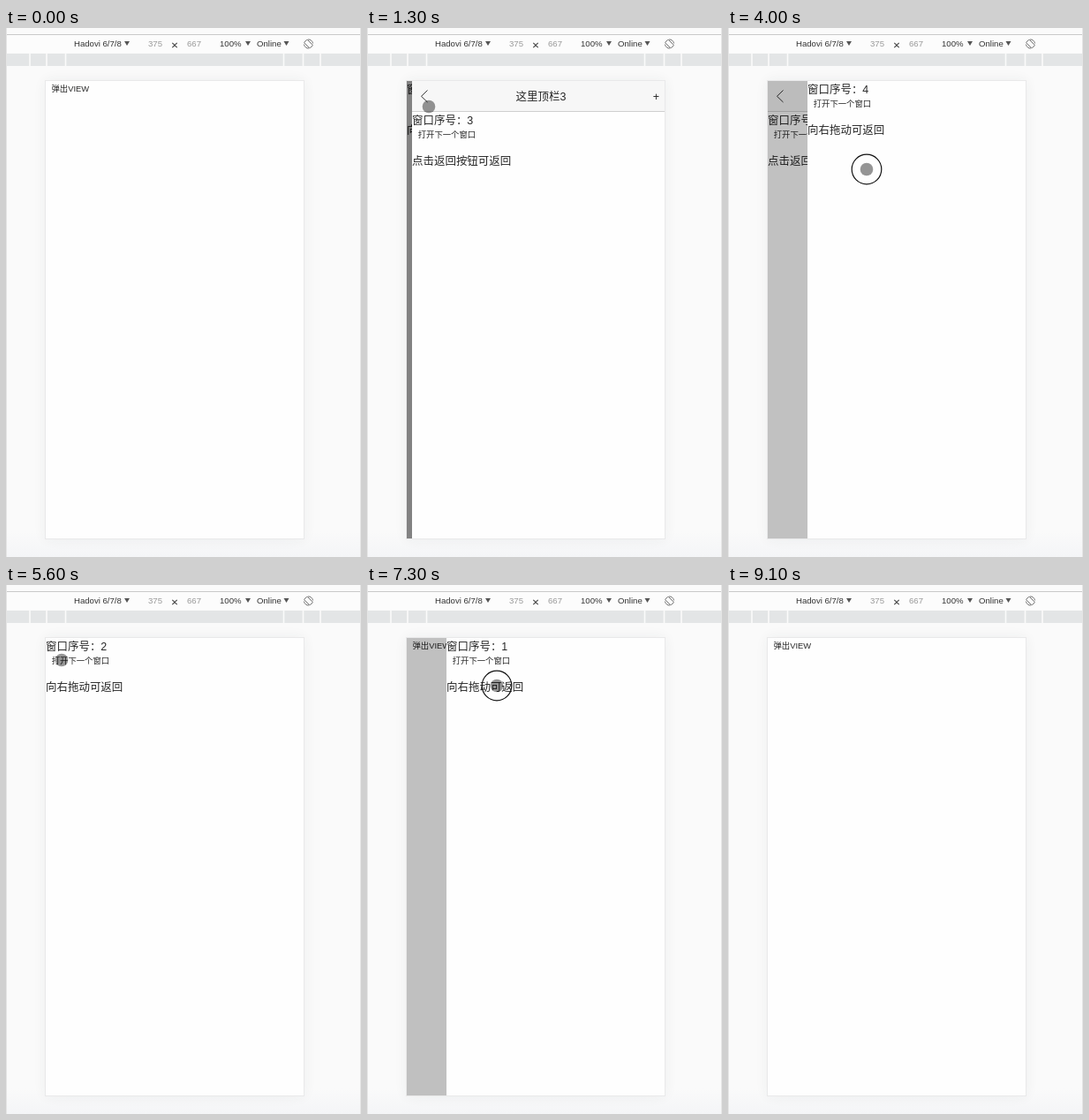
These frames come from a looping animation (402x599 px, 9200 ms). An HTML page:

```html
<!DOCTYPE html>
<html lang="zh-CN">
<head>
<meta charset="utf-8">
<title>Window stack</title>
<style>
  html, body { margin: 0; width: 100%; height: 100%; overflow: hidden; background: #fafafa; }
  svg { display: block; }
  .stage { position: absolute; left: 0; top: 0; }
  .phone {
    position: absolute; left: 45px; top: 60px; width: 292px; height: 518px;
    background: #fefefe; box-shadow: 0 0 0 1px #e9e9ea, 0 0 14px rgba(40, 50, 60, .07);
  }
  text { font-family: "Liberation Sans", "Noto Sans CJK SC", "Noto Sans CJK", sans-serif; fill: #262626; }
  .bar text { font-size: 9.6px; fill: #333; }
  .bar .size { fill: #999; }
  .big { font-size: 12.48px; }
  .small { font-size: 9.36px; }
</style>
</head>
<body>
<svg class="stage" width="402" height="599">
  <defs>
    <linearGradient id="floor" x1="0" y1="0" x2="0" y2="1">
      <stop offset="0" stop-color="#fafafa"/><stop offset="1" stop-color="#f4f5f7"/>
    </linearGradient>
    <path id="arrow" d="M-3 -2.5H3L0 2.5Z" fill="#555"/>
  </defs>
  <rect width="402" height="599" fill="#fafafa"/>
  <rect y="570" width="402" height="29" fill="url(#floor)"/>
  <rect y="7" width="402" height="1" fill="#c9c9c9"/>
  <rect y="8" width="402" height="20" fill="#fcfcfc"/>
  <rect y="29" width="402" height="14" fill="#e3e5e6"/>
  <path d="M27 29v14M46 29v14M67.5 29v14M314.5 29v14M336.5 29v14M356 29v14" stroke="#fafafa" stroke-width="1.6"/>
  <path d="M.5 0V599M401.5 0V599" stroke="#e4e4e4"/>
  <g class="bar">
    <text x="77" y="21">Hadovi 6/7/8</text>
    <text x="161" y="21" class="size">375</text>
    <text x="205" y="21" class="size">667</text>
    <text x="242" y="21">100%</text>
    <text x="284" y="21">Online</text>
    <use href="#arrow" x="137" y="17.5"/>
    <use href="#arrow" x="274" y="17.5"/>
    <use href="#arrow" x="317.5" y="17.5"/>
    <path d="M188.3 16.8l5.4 5.4M193.7 16.8l-5.4 5.4" stroke="#444" stroke-width="1.1"/>
    <g fill="none" stroke="#666" stroke-width=".9" transform="translate(342.5 18)">
      <rect x="-2.5" y="-4.6" width="5" height="9.2" rx=".8" transform="rotate(-45)"/>
      <path d="M-.5 -5A5 5 0 0 1 5 -.5M.5 5A5 5 0 0 1 -5 .5"/>
    </g>
  </g>
</svg>
<div class="phone">
  <svg id="screen" width="292" height="518">
    <text class="small" x="6.5" y="12">弹出VIEW</text>
  </svg>
</div>
<svg class="stage" width="402" height="599">
  <g id="cursor">
    <circle r="7.3" fill="#000" fill-opacity=".41"/>
    <circle id="ring" r="16.8" fill="none" stroke="#111" stroke-width="1.2"/>
  </g>
</svg>
<script>
const LOOP = 9200, STEP = 100, SLIDE = 410;
const WIDTH = 292, DIM = 0.5, PULL = 45.3;
const $ = id => document.getElementById(id);

// When each window opens, is grabbed (if draggable) and is let go or closed
const windows = [
  { open: 250, grab: 6650, close: 7700 },
  { open: 600, grab: 5600, close: 6000 },
  { open: 1000, close: 5000 },
  { open: 1900, grab: 2600, close: 4100 }
];

// Pointer stops: [time, x, y]
const stops = [
  [100, 70, 95], [250, 63, 69], [600, 63, 85], [1300, 70, 89], [1900, 88, 120],
  [2600, 92, 152], [2900, 117, 156], [3200, 198, 139], [4000, 157, 160],
  [5000, 60, 77], [5600, 63, 85], [6000, 172, 78], [6500, 114, 112],
  [7300, 147, 114], [7700, 195, 117]
];

const header = n => `
  <rect width="${WIDTH}" height="35" fill="#f7f7f7"/>
  <path d="M0 34.5H${WIDTH}" stroke="#cfcfcf"/>
  <path d="M17.5 10.5L10.5 17.3L17.5 24" fill="none" stroke="#333"/>
  <text class="big" x="146" y="21.7" text-anchor="middle">这里顶栏${n}</text>
  <text class="big" x="276.5" y="22" text-anchor="middle">+</text>`;

function page({ grab }, i) {
  const n = i + 1;
  return `<rect id="dim${i}" width="${WIDTH}" height="518"/>
  <g id="page${i}">
    <rect width="${WIDTH}" height="518" fill="#fefefe"/>
    ${grab ? "" : header(n)}
    <g transform="translate(0 ${grab ? 0 : 35})">
      <text class="big" y="13.7">窗口序号：${n}</text>
      <text class="small" x="6.7" y="29">打开下一个窗口</text>
      <text class="big" y="60.3">${grab ? "向右拖动可返回" : "点击返回按钮可返回"}</text>
    </g>
  </g>`;
}
$("screen").insertAdjacentHTML("beforeend", windows.map(page).join(""));

const clamp = p => Math.min(1, Math.max(0, p));
const mix = (a, b, p) => a + (b - a) * p;
const smooth = p => p * p * (3 - 2 * p);
const slide = t => 1 - (1 - clamp(t / SLIDE)) ** 3;

function pointer(t) {
  const i = Math.max(1, stops.findIndex(s => s[0] >= t));
  const [a, b] = t < stops.at(-1)[0] ? [stops[i - 1], stops[i]] : stops.slice(-2);
  const p = smooth(clamp((t - a[0]) / (b[0] - a[0])));
  return [mix(a[1], b[1], p), mix(a[2], b[2], p)];
}

// A grabbed window follows the pointer elastically, up to PULL
function pull(w, t) {
  const dx = Math.max(0, pointer(t)[0] - pointer(w.grab)[0]);
  return PULL * (1 - Math.exp(-dx / 7));
}

function pose(w, t) {
  if (t > w.close) {
    const [x, dim] = pose(w, w.close), p = slide(t - w.close);
    return [mix(x, WIDTH, p), mix(dim, 0, p)];
  }
  if (t > w.grab) {
    const x = pull(w, t);
    return [x, DIM - 0.26 * x / PULL];
  }
  const p = slide(t - w.open);
  return [mix(WIDTH, 0, p), DIM * p];
}

const show = (el, on) => el.setAttribute("visibility", on ? "visible" : "hidden");

function draw(t) {
  windows.forEach((w, i) => {
    const [x, dim] = pose(w, t);
    $("page" + i).setAttribute("transform", `translate(${Math.round(x)} 0)`);
    $("dim" + i).setAttribute("fill-opacity", dim.toFixed(3));
  });
  const visible = t >= 100 && t < 8200;
  $("cursor").setAttribute("transform", `translate(${pointer(t).join(" ")})`);
  show($("cursor"), visible);
  show($("ring"), visible && windows.some(w => t > w.grab && t < w.close));
}

function tick() {
  draw(Math.floor(performance.now() % LOOP / STEP) * STEP);
  requestAnimationFrame(tick);
}
tick();
</script>
</body>
</html>
```
